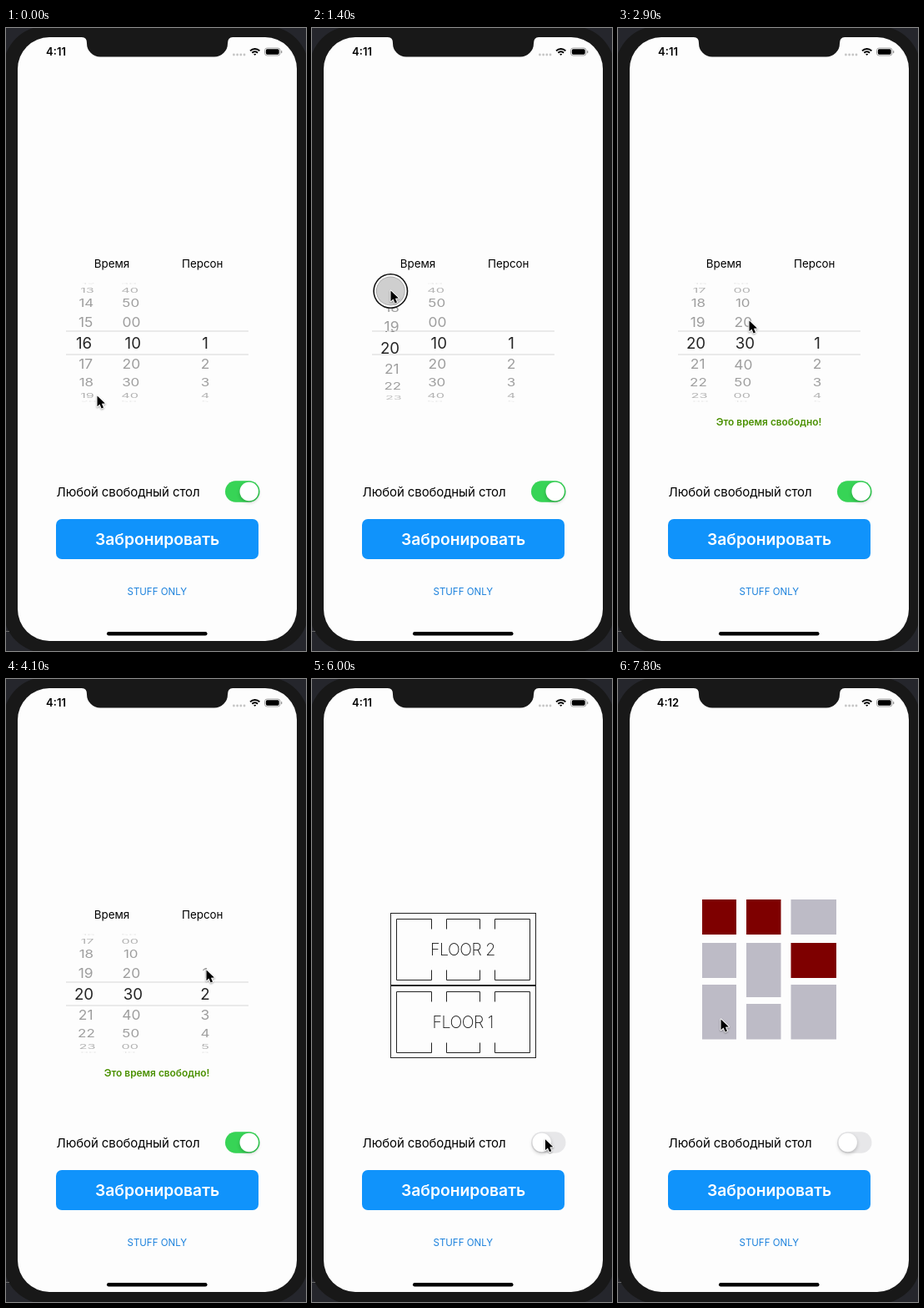
These frames come from a looping animation (360x746 px, 8000 ms). An HTML page with a canvas:

```html
<!DOCTYPE html>
<html lang="ru">
<head>
<meta charset="utf-8">
<style>
  html, body { margin: 0; width: 360px; height: 746px; overflow: hidden; background: #181818; }
  canvas { display: block; }
</style>
</head>
<body>
<canvas id="stage" width="360" height="746"></canvas>
<script>
const LOOP = 8000;
const c = document.getElementById('stage').getContext('2d');
const PAPER = '#fdfdfd';

// Motion tracks: [time, value...]
const hourKeys = [[450, 16], [1400, 19.75], [1700, 20]];
const minuteKeys = [[2150, 1], [2720, 2.9], [2950, 3]];
const personKeys = [[3450, 1], [3880, 1.9], [4080, 2]];
const switchKeys = [[5280, 1], [5390, 0.9], [5500, 0.9], [5720, 0]];
const stretchKeys = [[5260, 0], [5380, 4], [5520, 4], [5700, 0]];
const cursorKeys = [
  [0, 109, 440], [380, 95, 425], [450, 95, 425], [1400, 94, 314], [1600, 94, 314],
  [2050, 159, 410], [2150, 159, 410], [2720, 157, 350], [2900, 157, 350],
  [3100, 241, 384], [3450, 241, 384], [3880, 240, 348], [4100, 240, 348],
  [4300, 273, 558], [4500, 277, 566], [5100, 277, 566], [5250, 281, 553],
  [5950, 281, 553], [6650, 175, 411], [7250, 175, 411], [7700, 123, 407]
];
const presses = [[450, 1480], [2100, 2760], [3420, 3950], [5450, 5650], [6720, 6950]];

const clamp = v => Math.max(0, Math.min(1, v));
const ramp = (t, a, b) => clamp((t - a) / (b - a));
const smooth = k => k * k * (3 - 2 * k);

function track(t, keys, i = 1) {
  let a = keys[0];
  for (const b of keys) {
    if (t < b[0]) return a === b ? a[i] : a[i] + (b[i] - a[i]) * smooth(ramp(t, a[0], b[0]));
    a = b;
  }
  return a[i];
}

function box(x, y, w, h, r, fill) {
  c.beginPath();
  c.roundRect(x, y, w, h, r);
  c.fillStyle = fill;
  c.fill();
}

function disc(x, y, r, fill) {
  c.beginPath();
  c.arc(x, y, r, 0, 7);
  c.fillStyle = fill;
  c.fill();
}

function text(str, x, y, size, weight, fill, spacing = 0) {
  c.font = `${weight} ${size}px Inter, Roboto, sans-serif`;
  c.letterSpacing = spacing + 'px';
  c.textAlign = 'center';
  c.fillStyle = fill;
  c.fillText(str, x, y);
}

function faded(alpha, draw) {
  if (alpha <= 0) return;
  c.save();
  c.globalAlpha = alpha;
  draw();
  c.restore();
}

function phone(t) {
  c.fillStyle = '#25262c';
  c.fillRect(0, 0, 360, 746);
  box(-3, -2, 366, 750, 50, '#181818');
  box(0, 722, 4, 1, 0, '#666');
  box(14, 11, 335, 723, 38, PAPER);

  c.beginPath();
  c.moveTo(90, 10);
  c.lineTo(91, 11);
  c.quadraticCurveTo(97, 11, 97, 18);
  c.arcTo(97, 34.5, 114, 34.5, 16);
  c.lineTo(250, 34.5);
  c.arcTo(266, 34.5, 266, 18, 16);
  c.quadraticCurveTo(266, 11, 272, 11);
  c.lineTo(273, 10);
  c.fillStyle = '#181818';
  c.fill();

  text(t < 7500 ? '4:11' : '4:12', 60, 33.3, 13, 600, '#000');
  for (let i = 0; i < 4; i++) disc(273.4 + i * 4.2, 32, 1.4, '#c5c5c5');

  // Wi-Fi
  c.strokeStyle = '#000';
  c.lineWidth = 2;
  for (const r of [1.2, 4.7, 8]) {
    c.beginPath();
    c.arc(298.7, 33, r, -Math.PI * 0.75, -Math.PI * 0.25);
    c.stroke();
  }
  // Battery
  c.beginPath();
  c.roundRect(310.5, 24, 18.5, 9, 2.8);
  c.strokeStyle = '#999';
  c.lineWidth = 0.9;
  c.stroke();
  box(311.8, 25.3, 15.9, 6.4, 1.6, '#000');
  box(330, 27, 1.3, 3.2, 0.7, '#999');

  box(121, 723, 120.5, 4.4, 2.2, '#000');
}

function wheelPass(pos, x, origin, label, first, inBand) {
  for (let i = Math.round(pos) - 4; i <= Math.round(pos) + 4; i++) {
    const a = (i - pos) * 0.365;
    const depth = Math.cos(a);
    if (i < first || depth <= 0.05) continue;
    const s = inBand ? 1 : 0.94 - 0.13 * (1 - depth);
    const shade = inBand ? 0.86 : 0.38 * clamp(depth * 1.6 + 0.05);
    c.save();
    c.translate(origin + (x - origin) * s, 377 + 71 * Math.sin(a));
    c.scale(s, s * depth);
    text(label(i), 0, 6.8, 18.7, 400, `rgba(0,0,0,${shade})`);
    c.restore();
  }
}

function picker(t) {
  const two = n => String(n).padStart(2, '0');
  text('Время', 127, 286.5, 13.4, 400, '#000');
  text('Персон', 235.7, 286.5, 13.4, 400, '#000');
  for (const inBand of [false, true]) {
    c.save();
    c.beginPath();
    if (inBand) c.rect(72, 363, 219, 28);
    else {
      c.rect(72, 304, 219, 59);
      c.rect(72, 391, 219, 58);
    }
    c.clip();
    wheelPass(track(t, hourKeys), 93.5, 124.5, i => two(i % 24), 0, inBand);
    wheelPass(track(t, minuteKeys), 152.3, 124.5, i => two((i + 60) % 6 * 10), -9, inBand);
    wheelPass(track(t, personKeys), 239, 239, String, 1, inBand);
    c.restore();
  }
  box(72, 362.5, 219, 1, 0, '#d8d8d8');
  box(72, 390.5, 219, 1, 0, '#d8d8d8');
  faded(ramp(t, 1690, 1780), () =>
    text('Это время свободно!', 181, 476, 11.9, 600, '#4a9000'));
}

function line(...points) {
  c.beginPath();
  points.forEach(([x, y]) => c.lineTo(x + 0.5, y + 0.5));
  c.stroke();
}

function floor(top, name, ink) {
  box(95, top, 173, 86, 0, PAPER);
  c.strokeStyle = '#222';
  c.lineWidth = 1;
  c.strokeRect(94.5, top + 0.5, 174, 86);
  const a = top + 7, b = top + 80, a2 = a + 12, b2 = b - 12;
  line([143, a2], [143, a], [101, a], [101, b], [143, b], [143, b2]);
  line([219, a2], [219, a], [261, a], [261, b], [219, b], [219, b2]);
  line([161, a2], [161, a], [201, a], [201, a2]);
  line([161, b2], [161, b], [201, b], [201, b2]);
  text(name, 181, top + 50.5, 19.6, 200, ink, -0.5);
}

function floors(t) {
  const press = ramp(t, 6780, 6860);
  floor(280, 'FLOOR 2', '#111');
  floor(367, 'FLOOR 1', `rgba(17,17,17,${1 - 0.65 * press})`);
}

function tables() {
  const grey = '#bdbbc6', red = '#7e0000';
  const plan = [
    [101, 264, 41, 42, red], [154, 264, 41.5, 42, red], [207.5, 264, 54.5, 42, grey],
    [101, 316, 41, 42, grey], [154, 316, 41.5, 65, grey], [207.5, 316, 54.5, 42, red],
    [101, 366, 41, 65.5, grey], [154, 389, 41.5, 42.5, grey], [207.5, 366, 54.5, 65.5, grey]
  ];
  for (const [x, y, w, h, fill] of plan) box(x, y, w, h, 0, fill);
}

function controls(t) {
  text('Любой свободный стол', 146.5, 560.5, 15, 400, '#000', -0.1);

  const on = track(t, switchKeys), stretch = track(t, stretchKeys);
  box(263, 542.3, 41.5, 25.4, 12.7, '#e7e7e9');
  faded(on < 0.9 ? on / 0.9 : 1, () => box(263, 542.3, 41.5, 25.4, 12.7, '#37d456'));
  c.save();
  c.shadowColor = 'rgba(0,0,0,.22)';
  c.shadowBlur = 4;
  c.shadowOffsetY = 2;
  box(264.5 + on * (16 - stretch), 543.8, 22.4 + stretch, 22.4, 11.2, '#fff');
  c.restore();

  box(60, 588, 243, 48, 7, '#1093fb');
  text('Забронировать', 181.5, 618.8, 19.3, 600, '#fff');
  text('STUFF ONLY', 181.3, 679.3, 11.5, 400, '#1a80dc');
}

function pointer(t) {
  const x = track(t, cursorKeys, 1), y = track(t, cursorKeys, 2);
  for (const [from, to] of presses) {
    faded(Math.min(ramp(t, from, from + 60), 1 - ramp(t, to - 60, to)), () => {
      disc(x + 0.3, y + 1, 21, '#111');
      disc(x + 0.3, y + 1, 19.4, '#fff');
      disc(x + 0.3, y + 1, 17.4, '#aaa');
      disc(x + 0.3, y + 1, 16.5, '#cfcfcf');
    });
  }
  c.save();
  c.translate(x, y);
  c.beginPath();
  for (const [px, py] of [[0.5, 0.5], [0.5, 13.3], [3.5, 10.6], [5.6, 15.4], [8, 14.4], [5.9, 9.7], [9.9, 9.5]])
    c.lineTo(px, py);
  c.closePath();
  c.lineJoin = 'round';
  c.lineWidth = 2;
  c.strokeStyle = '#fff';
  c.shadowColor = 'rgba(0,0,0,.35)';
  c.shadowBlur = 2;
  c.shadowOffsetY = 1;
  c.stroke();
  c.shadowColor = 'transparent';
  c.fillStyle = '#000';
  c.fill();
  c.restore();
}

// Groups fade as a whole: paint the content, then veil it with paper.
function veil(alpha) {
  faded(alpha, () => box(70, 262, 224, 222, 0, PAPER));
}

function draw(t) {
  phone(t);
  const away = ramp(t, 5600, 5780), back = ramp(t, 5700, 5900);
  const plan = ramp(t, 7050, 7380);
  if (away < 1) {
    picker(t);
    veil(away);
  }
  if (plan > 0) {
    tables();
    veil(1 - plan);
  }
  faded(back * (1 - plan), () => floors(t));
  controls(t);
  pointer(t);
}

const start = performance.now();
function tick() {
  draw((performance.now() - start) % LOOP);
  requestAnimationFrame(tick);
}
tick();
</script>
</body>
</html>
```
